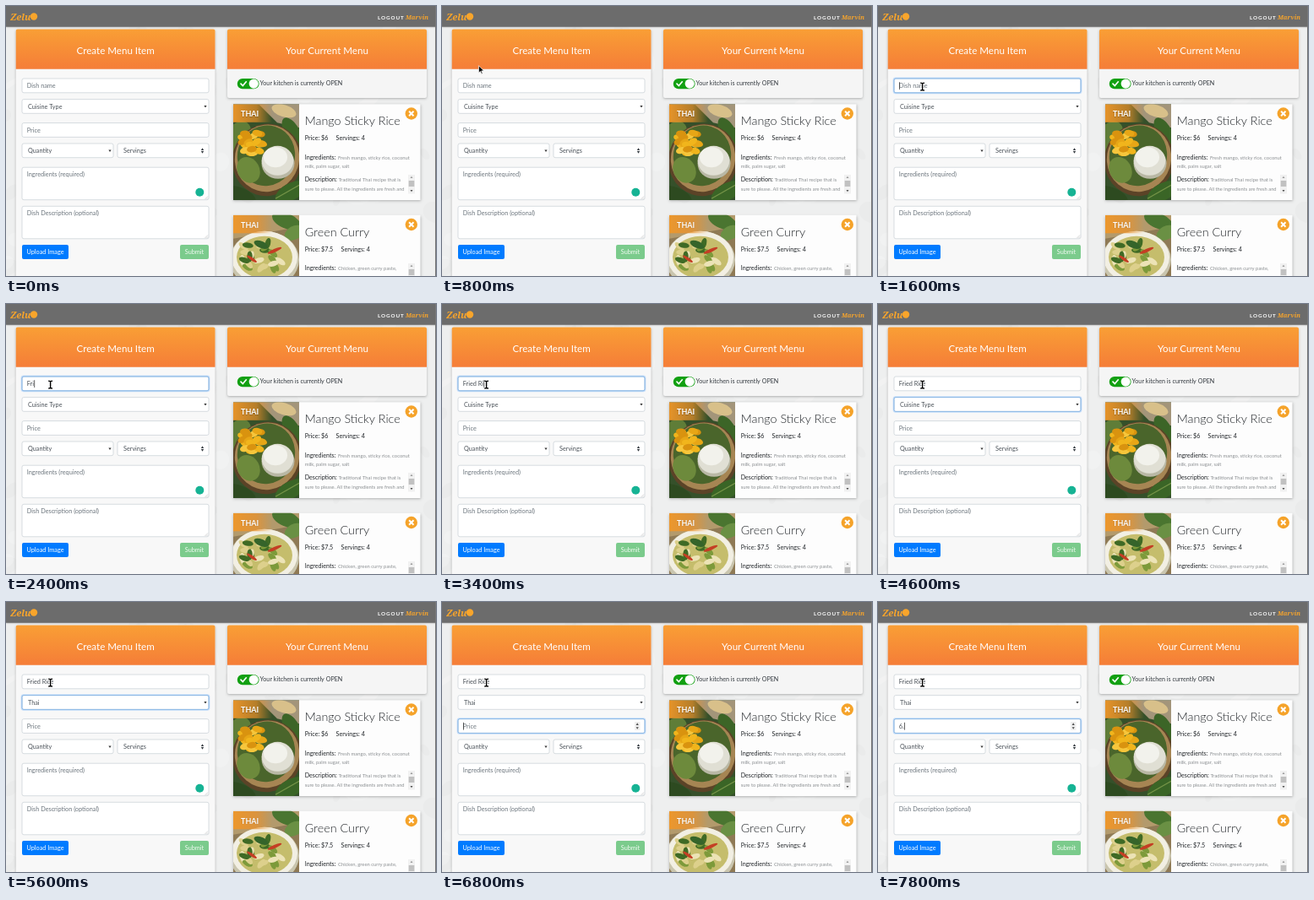
Write an HTML page with a canvas that moves like this. It is 509 by 320 pixels and loops after 8 s.

```html
<!DOCTYPE html>
<html lang="en">
<head>
<meta charset="utf-8">
<title>Menu editor</title>
<style>
  html, body { margin: 0; width: 100%; height: 100%; overflow: hidden; background: #eee; }
  canvas { display: block; width: 509px; height: 320px; }
</style>
</head>
<body>
<canvas id="stage"></canvas>
<script>
const W = 509, H = 320, LOOP = 8000, STEP = 200;
const canvas = document.getElementById('stage');
const dpr = window.devicePixelRatio || 1;
canvas.width = W * dpr;
canvas.height = H * dpr;
let ctx = canvas.getContext('2d');

const SANS = 'Lato, sans-serif';
const SCRIPT = '"Noto Serif", serif';
const ORANGE = '#f9a52b', INK = '#495057', HINT = '#6c757d';

function text(str, x, y, size, color, { weight = 400, align = 'left', family = SANS, style = '', gap = 0 } = {}) {
  ctx.font = `${style} ${weight} ${size}px ${family}`;
  ctx.letterSpacing = gap + 'px';
  ctx.textAlign = align;
  ctx.fillStyle = color;
  ctx.fillText(str, x, y);
  ctx.letterSpacing = '0px';
}

function rect(x, y, w, h, fill) {
  ctx.fillStyle = fill;
  ctx.fillRect(x, y, w, h);
}

function round(x, y, w, h, r, fill, stroke, line = 0.7) {
  ctx.beginPath();
  ctx.roundRect(x, y, w, h, r);
  if (fill) { ctx.fillStyle = fill; ctx.fill(); }
  if (stroke) { ctx.strokeStyle = stroke; ctx.lineWidth = line; ctx.stroke(); }
}

function oval(x, y, rx, ry, fill, turn = 0) {
  ctx.fillStyle = fill;
  ctx.beginPath();
  ctx.ellipse(x, y, rx, ry, turn, 0, Math.PI * 2);
  ctx.fill();
}

function poly(points, fill) {
  ctx.fillStyle = fill;
  ctx.beginPath();
  points.forEach(([x, y]) => ctx.lineTo(x, y));
  ctx.closePath();
  ctx.fill();
}

function lines(points, color, width) {
  ctx.strokeStyle = color;
  ctx.lineWidth = width;
  ctx.beginPath();
  points.forEach(([x, y], i) => i ? ctx.lineTo(x, y) : ctx.moveTo(x, y));
  ctx.stroke();
}

function shadowed(blur, dy, draw) {
  ctx.save();
  ctx.shadowColor = 'rgba(0,0,0,.27)';
  ctx.shadowBlur = blur * dpr;
  ctx.shadowOffsetY = dy * dpr;
  draw();
  ctx.restore();
}

function seeded(seed) {
  return () => (seed = (seed * 16807) % 2147483647) / 2147483647;
}

function arrow(x, y, dir, size, color) {
  poly([[x - size, y - dir * size * 0.7], [x + size, y - dir * size * 0.7], [x, y + dir * size * 0.9]], color);
}

function backdrop() {
  rect(0, 0, W, H, '#eeefef');
  const rnd = seeded(91);
  for (let i = 0; i < 90; i++) {
    oval(rnd() * W, rnd() * H, 4 + rnd() * 14, 3 + rnd() * 9,
      rnd() > 0.5 ? 'rgba(255,255,255,.2)' : 'rgba(205,208,210,.13)', rnd() * 3);
  }
}

function topBar() {
  shadowed(2, 0.5, () => rect(0, 0, W, 24.7, '#6c6c6c'));
  text('Zelu', 5, 17, 11, ORANGE, { weight: 700, family: SCRIPT, style: 'italic' });
  oval(33, 12.5, 4.2, 4.2, ORANGE);
  text('LOGOUT', 440, 16, 6.3, '#fff', { weight: 700, gap: 0.9 });
  text('Marvin', 473, 16, 7.2, ORANGE, { weight: 600, family: SCRIPT, style: 'italic' });
}

function panel(x, w, bottom, title, fill) {
  shadowed(3, 1, () => round(x, 27.5, w, bottom - 27.5, 2, fill));
  const g = ctx.createLinearGradient(0, 27, 0, 75);
  g.addColorStop(0, '#f99f35');
  g.addColorStop(1, '#f57d38');
  round(x, 27.5, w, 47.3, [2, 2, 0, 0], g);
  text(title, x + w / 2, 57, 11.6, '#fff', { align: 'center' });
}

function toggle() {
  round(273.8, 86, 25.7, 12.3, 6.1, '#12a012');
  oval(293.2, 92.1, 5.6, 5.6, '#fff');
  ctx.lineCap = 'round';
  lines([[278, 92.2], [280.3, 94.5], [284.3, 89.8]], '#fff', 1.7);
  ctx.lineCap = 'butt';
  text('Your kitchen is currently OPEN', 300.6, 94.3, 7.2, '#343a40');
}

function mangoPhoto(x, y) {
  rect(x, y, 78, 114, '#35502a');
  poly([[x + 30, y], [x + 78, y], [x + 78, y + 28], [x + 52, y + 22]], '#a3957a');
  oval(x + 60, y + 8, 15, 7, '#d8c08a', 0.3);
  oval(x + 4, y + 40, 14, 22, '#5f7d38', 0.6);
  oval(x + 70, y + 34, 9, 20, '#3c6527', -0.5);
  oval(x + 40, y + 66, 41, 43, '#5b4327', 0.3);
  oval(x + 40, y + 64, 38, 40, '#a68553', 0.3);
  oval(x + 39, y + 61, 34, 36, '#4a652b', 0.3);
  oval(x + 18, y + 78, 13, 16, '#6d8a3c', -0.5);
  oval(x + 8, y + 108, 20, 9, '#2d4a20', 0.4);
  oval(x + 68, y + 104, 20, 10, '#3a6526', -0.5);
  lines([[x + 50, y + 112], [x + 78, y + 96]], '#759448', 1.2);
  const rnd = seeded(17);
  for (let i = 0; i < 22; i++) {
    oval(x + 11 + rnd() * 26, y + 34 + rnd() * 25, 6, 3.8,
      ['#f1b51c', '#d9930f', '#f6c63c', '#e7a616'][i % 4], -0.6 + rnd());
  }
  oval(x + 53, y + 70, 19.5, 18.5, '#b9b8a5');
  oval(x + 52.5, y + 67, 18.8, 17.5, '#e0dfd4');
  oval(x + 50, y + 63, 14, 12, '#f2f2ec');
}

function curryPhoto(x, y) {
  rect(x, y, 78, 114, '#8f7a55');
  poly([[x, y], [x + 78, y], [x + 78, y + 14], [x, y + 28]], '#b39a6c');
  oval(x + 63, y + 7, 18, 9, '#4a7530', 0.4);
  oval(x + 72, y + 21, 12, 8, '#6a9044', -0.5);
  oval(x + 37, y + 53, 41, 34, '#c9c5ae');
  oval(x + 37, y + 50, 39, 31, '#f2efe3');
  oval(x + 37, y + 50, 33, 25, '#c5bd6c');
  const rnd = seeded(43);
  for (let i = 0; i < 24; i++) {
    oval(x + 11 + rnd() * 50, y + 30 + rnd() * 36, 6.5, 3.2,
      ['#ece3b6', '#7d9a3a', '#ddd08c', '#3f6a25'][i % 4], rnd() * 3);
  }
  oval(x + 49, y + 42, 9, 2, '#c43f24', -0.4);
  oval(x + 22, y + 52, 7, 1.8, '#c43f24', 0.6);
  oval(x + 33, y + 35, 9, 4, '#35642a', 0.4);
}

function badge(x, y) {
  const g = ctx.createLinearGradient(x, 0, x + 46, 0);
  g.addColorStop(0, 'rgba(239,151,41,.95)');
  g.addColorStop(0.6, 'rgba(235,145,42,.7)');
  g.addColorStop(1, 'rgba(235,145,42,0)');
  rect(x, y, 46, 21.5, g);
  shadowed(1, 0.5, () => text('THAI', x + 9, y + 14.8, 9, '#fff', { weight: 700 }));
}

function closeButton(x, y) {
  oval(x, y, 7.2, 7.2, '#f5a32a');
  lines([[x - 2.7, y - 2.7], [x + 2.7, y + 2.7]], '#fff', 2);
  lines([[x + 2.7, y - 2.7], [x - 2.7, y + 2.7]], '#fff', 2);
}

function scrollbar(y) {
  rect(476, y, 8, 22.5, '#f1f1f1');
  arrow(480, y + 3, -1, 1.5, '#9a9a9a');
  rect(476.7, y + 7, 6.6, 7, '#c1c1c1');
  arrow(480, y + 19, 1, 1.5, '#505050');
}

function dish(y, name, price, photo, ingredients, description) {
  shadowed(3, 1, () => rect(269, y, 221.5, 113.7, '#fdfdfd'));
  ctx.save();
  ctx.beginPath();
  ctx.rect(269, y, 78, 113.7);
  ctx.clip();
  photo(269, y);
  badge(269, y);
  ctx.restore();
  const black = '#212529', pale = '#8b8f92', x = 353.7;
  text(name, x, y + 25, 14.35, black, { weight: 300 });
  text('Price: ' + price, x, y + 42.7, 7.2, black);
  text('Servings: 4', price.length > 2 ? 396.5 : 390.5, y + 42.7, 7.2, black);
  text('Ingredients:', x, y + 65.6, 7.15, black);
  text(ingredients[0], 393, y + 65.6, 5.85, pale);
  text(ingredients[1], x, y + 76, 5.85, pale);
  text('Description:', x, y + 92, 7.15, black);
  text(description[0], 393.5, y + 92, 5.85, pale);
  text(description[1], x, y + 102.6, 5.75, pale);
  closeButton(479.8, y + 11.2);
}

function select(x, y, w, label, both) {
  round(x, y, w, 16.7, 2, '#fff', '#c8ced4');
  text(label, x + 7, y + 11, 7.25, INK);
  if (both) {
    arrow(x + w - 7.5, y + 6.8, -1, 1.7, '#343a40');
    arrow(x + w - 7.5, y + 10.2, 1, 1.7, '#343a40');
  } else {
    arrow(x + w - 4, y + 8.5, 1, 1.6, '#333');
  }
}

function box(y, h, hint) {
  round(19, y, 221, h, 2, '#fff', '#c8ced4');
  if (hint) text(hint, 24.8, y + (h > 20 ? 10.4 : 11.3), 7.3, HINT);
}

function grip(y) {
  lines([[235.5, y], [239, y - 3.5]], '#aaa', 0.5);
  lines([[237.5, y], [239, y - 1.5]], '#aaa', 0.5);
}

function staticScene() {
  backdrop();
  topBar();
  panel(11.7, 235.8, 330, 'Create Menu Item', '#f8f8f8');
  panel(262, 236, 109, 'Your Current Menu', '#f5f5f5');
  toggle();
  dish(116.3, 'Mango Sticky Rice', '$6', mangoPhoto,
    ['Fresh mango, sticky rice, coconut', 'milk, palm sugar, salt'],
    ['Traditional Thai recipe that is', 'sure to please. All the ingredients are fresh and']);
  scrollbar(200);
  dish(247.8, 'Green Curry', '$7.5', curryPhoto,
    ['Chicken, green curry paste,', ''], ['', '']);
  scrollbar(305);
  select(19, 163, 108, 'Quantity');
  select(132, 163, 108, 'Servings', true);
  box(191.2, 38.5, 'Ingredients (required)');
  grip(229);
  oval(229.3, 220.8, 5, 5, '#16b394');
  box(237.3, 38.5, 'Dish Description (optional)');
  grip(275);
  round(19, 283, 55, 17, 2, '#007bff');
  text('Upload Image', 46.5, 294.4, 7.3, '#fff', { align: 'center' });
  round(206, 283, 34, 17, 2, '#7bcb8c');
  text('Submit', 223, 294.4, 7.3, '#f2faf3', { align: 'center' });
  rect(W - 1, 0, 1, H, '#777');
}

function focusRing(y) {
  round(18.4, y - 0.6, 222.2, 18, 2.4, null, 'rgba(0,123,255,.2)', 1.6);
  round(19, y, 221, 16.8, 2, null, '#80b4e8', 0.8);
}

function field(y, value, hint, focused, caretOn) {
  box(y, 16.8, value ? '' : hint);
  text(value, 24.8, y + 11.3, 7.3, INK);
  if (!focused) return;
  const end = value ? 25.2 + ctx.measureText(value).width : 25;
  focusRing(y);
  if (caretOn) rect(end, y + 4.2, 0.7, 8.8, '#222');
}

function beam(x, y) {
  const shape = [[x - 2.4, y - 4.2], [x, y - 3.6], [x + 2.4, y - 4.2], [x, y - 3.6],
    [x, y + 4.2], [x - 2.4, y + 4.8], [x, y + 4.2], [x + 2.4, y + 4.8]];
  lines(shape, '#fff', 2.6);
  lines(shape, '#000', 1.4);
}

function pointer(x, y) {
  const tip = [[0, 0], [0, 8.5], [2, 6.7], [3.4, 9.8], [4.7, 9.2], [3.3, 6.2], [6, 6]]
    .map(([a, b]) => [x + a, y + b]);
  poly(tip, '#000');
  lines([...tip, tip[0]], '#fff', 0.7);
}

function mouse(t) {
  if (t < 600) return;
  const p = Math.min(1, (t - 600) / 600);
  const ease = 1 - (1 - p) ** 2;
  const x = 32 + 20.6 * ease, y = 40 + 55.3 * ease;
  (y > 86 ? beam : pointer)(x, y);
}

const typed = (str, t, start) => str.slice(0, Math.max(0, Math.floor((t - start) / STEP) + 1));
const blink = (t, start) => (t - start) % 1000 < 500;

function form(t) {
  const onDish = t >= 1400 && t < 4200;
  const onType = t >= 4200 && t < 6600;
  const onPrice = t >= 6600;
  const dishCaret = t < 2000 ? blink(t, 1400) : t < 4000 || blink(t, 3800);

  field(86, typed('Fried Rice', t, 2000), 'Dish name', onDish, dishCaret);
  select(19, 110.6, 221, t >= 5200 ? 'Thai' : 'Cuisine Type');
  if (onType) focusRing(110.6);
  field(138.6, typed('6.', t, 7400), 'Price', onPrice, t >= 7400 || blink(t, 6600));
  if (onPrice) {
    rect(228, 142, 6.5, 10, '#f0f0f0');
    arrow(231.2, 144.8, -1, 1.6, '#505050');
    arrow(231.2, 149.4, 1, 1.6, '#505050');
  }
}

// The unchanging page is painted once on its own layer.
const layer = document.createElement('canvas');
layer.width = canvas.width;
layer.height = canvas.height;
const screen2d = ctx;
ctx = layer.getContext('2d');
ctx.scale(dpr, dpr);
staticScene();
ctx = screen2d;
ctx.scale(dpr, dpr);

const began = performance.now();
function frame() {
  const elapsed = Math.max(0, performance.now() - began) % LOOP;
  const t = Math.floor(elapsed / STEP) * STEP;
  ctx.drawImage(layer, 0, 0, W, H);
  form(t);
  mouse(t);
  requestAnimationFrame(frame);
}
frame();
</script>
</body>
</html>
```
